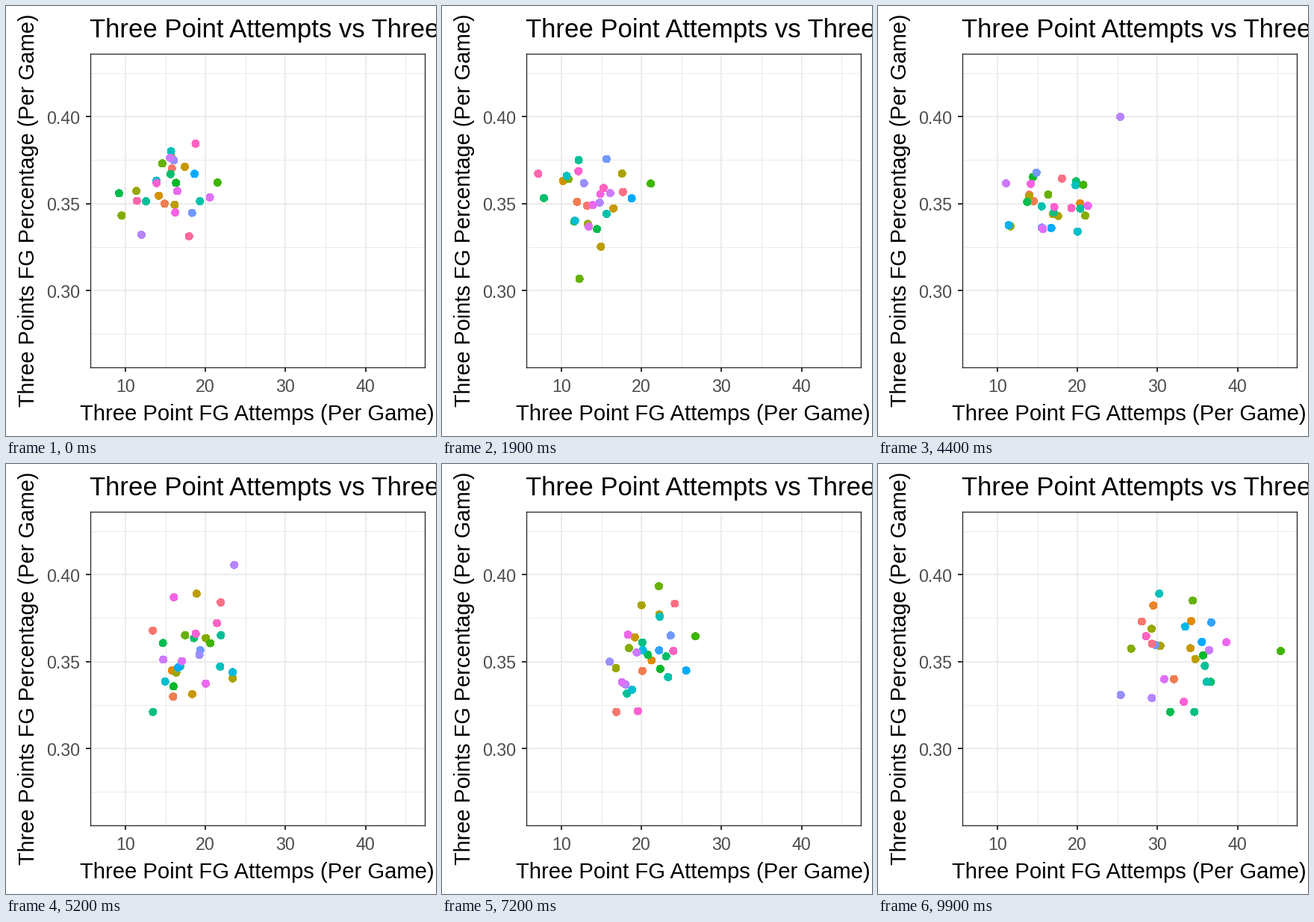
A matplotlib script that plays this animation: 576 by 576 pixels, repeating every 10000 ms.

```python
import numpy as np
import matplotlib.pyplot as plt
from matplotlib.animation import FuncAnimation

SIZE, DPI = 576, 72
FRAMES, INTERVAL = 100, 100
SEASONS, TEAMS = 24, 37
FONT = "Liberation Sans"
GREY = "#4D4D4D"

# First and last season of teams that did not play throughout.
SPANS = {2: (17, 23), 3: (9, 23), 4: (0, 6), 15: (6, 23), 19: (0, 16),
         20: (12, 17), 21: (18, 23), 22: (7, 11), 24: (13, 23),
         31: (0, 12), 34: (0, 5), 35: (0, 1), 36: (2, 23)}

# Teams that leave the crowd: season, attempts, per mille made.
PATHS = {
    10: [(0, 14.6, 373), (3, 10.5, 264), (5, 13, 325), (16, 20, 388), (20, 31.6, 416), (23, 34.4, 385)],
    11: [(0, 21.5, 362), (16, 20.3, 360), (17, 28.9, 366), (20, 30.9, 347), (21, 40.3, 357), (23, 45.4, 356)],
    27: [(0, 12, 332), (4, 14, 347), (10, 25.6, 399), (14, 21.6, 412), (17, 17.7, 330), (23, 29.3, 329)],
}


def build_seasons(rng):
    """Positions per season and team: a drifting crowd plus the paths."""
    season = np.arange(SEASONS)
    attempts = np.interp(season, [0, 1, 2, 10, 16, 19, 23],
                         [15.8, 16.8, 12.7, 16, 18.4, 22.4, 32])
    made = 355 + 10 * np.exp(-season)
    crowd = np.column_stack([attempts, made])

    # Each team keeps part of its offset from one season to the next.
    keep = 0.6
    offset = rng.normal(size=(SEASONS, TEAMS, 2))
    for s in range(1, SEASONS):
        offset[s] = keep * offset[s - 1] + np.sqrt(1 - keep ** 2) * offset[s]
    pos = crowd[:, None] + np.clip(offset, -2, 2) * [3.3, 17]

    for team, path in PATHS.items():
        when, *values = np.transpose(path)
        for k, value in enumerate(values):
            pos[:, team, k] = np.interp(season, when, value)
    # A team that stops playing waits in place until the next season.
    for team, (_, last) in SPANS.items():
        pos[last + 1:, team] = pos[last, team]
    return pos


def hcl(hue, chroma=100, lum=65):
    """Polar CIE-LUV colour to sRGB."""
    h = np.radians(hue)
    u = chroma * np.cos(h) / (13 * lum) + 0.1978
    v = chroma * np.sin(h) / (13 * lum) + 0.4683
    y = ((lum + 16) / 116) ** 3
    x = 9 * y * u / (4 * v)
    z = -x / 3 - 5 * y + 3 * y / v
    rgb = np.array([[3.2405, -1.5371, -0.4985],
                    [-0.9693, 1.8760, 0.0416],
                    [0.0556, -0.2040, 1.0572]]) @ [x, y, z]
    rgb = np.clip(rgb, 0, 1)
    return np.where(rgb > 0.00304, 1.055 * rgb ** (1 / 2.4) - 0.055, 12.92 * rgb)


positions = build_seasons(np.random.default_rng(7))
colors = np.array([hcl(15 + 360 * i / TEAMS) for i in range(TEAMS)])
spans = np.array([SPANS.get(i, (0, SEASONS - 1)) for i in range(TEAMS)])
# Seasons land on whole frames; dots move linearly in between.
season_at = np.round(np.linspace(0, FRAMES - 1, SEASONS))

# Panel edges and scales in pixels from the top left.
LEFT, RIGHT, TOP, BOTTOM = 112.5, 560.5, 63.5, 484
X10, PX_X = 160, 10.72
Y300, PX_Y = 381, 2.33

fig = plt.figure(figsize=(SIZE / DPI, SIZE / DPI), dpi=DPI, facecolor="white")
ax = fig.add_axes([LEFT / SIZE, 1 - BOTTOM / SIZE,
                   (RIGHT - LEFT) / SIZE, (BOTTOM - TOP) / SIZE])
ax.set_xlim(10 + (LEFT - X10) / PX_X, 10 + (RIGHT - X10) / PX_X)
ax.set_ylim(300 + (Y300 - BOTTOM) / PX_Y, 300 + (Y300 - TOP) / PX_Y)
ax.set_axisbelow(True)
ax.set_xticks(range(10, 41, 10))
ax.set_xticks(range(15, 46, 10), minor=True)
ax.set_yticks(range(300, 401, 50))
ax.set_yticks(range(275, 426, 50), minor=True)
ax.grid(which="major", color="#EBEBEB", lw=2)
ax.grid(which="minor", color="#EBEBEB", lw=1)
ax.tick_params(which="major", length=6, width=2, color="#333333",
               labelbottom=False, labelleft=False)
ax.tick_params(which="minor", length=0)
for spine in ax.spines.values():
    spine.set(color="#333333", linewidth=1.4)


def label(x, y, text, size, color="black", ha="center", rotation=0):
    fig.text(x / SIZE, 1 - y / SIZE, text, fontsize=size, color=color, ha=ha,
             va="baseline", rotation=rotation, rotation_mode="anchor",
             family=FONT)


label(112, 42, "Three Point Attempts vs Three", 34.7, ha="left")
label(336.5, 555, "Three Point FG Attemps (Per Game)", 29.3)
label(38, 273.5, "Three Points FG Percentage (Per Game)", 28.9, rotation=90)
for tick in range(10, 41, 10):
    label(X10 + (tick - 10) * PX_X, 517, str(tick), 23.2, GREY)
for tick in range(300, 401, 50):
    label(99, Y300 - (tick - 300) * PX_Y + 10, f"{tick / 1000:.2f}", 23.2,
          GREY, ha="right")

dots = ax.scatter([], [], s=100, linewidths=0, zorder=3, antialiased=False)


def update(frame):
    s = np.searchsorted(season_at, frame, "right") - 1
    nxt = min(s + 1, SEASONS - 1)
    w = (frame - season_at[s]) / max(season_at[nxt] - season_at[s], 1)
    shown = (spans[:, 0] <= s) & (s <= spans[:, 1])
    dots.set_offsets((positions[s] * (1 - w) + positions[nxt] * w)[shown])
    dots.set_facecolors(colors[shown])
    return (dots,)


anim = FuncAnimation(fig, update, frames=FRAMES, interval=INTERVAL,
                     repeat=True, repeat_delay=0, blit=False)
plt.show()
```
